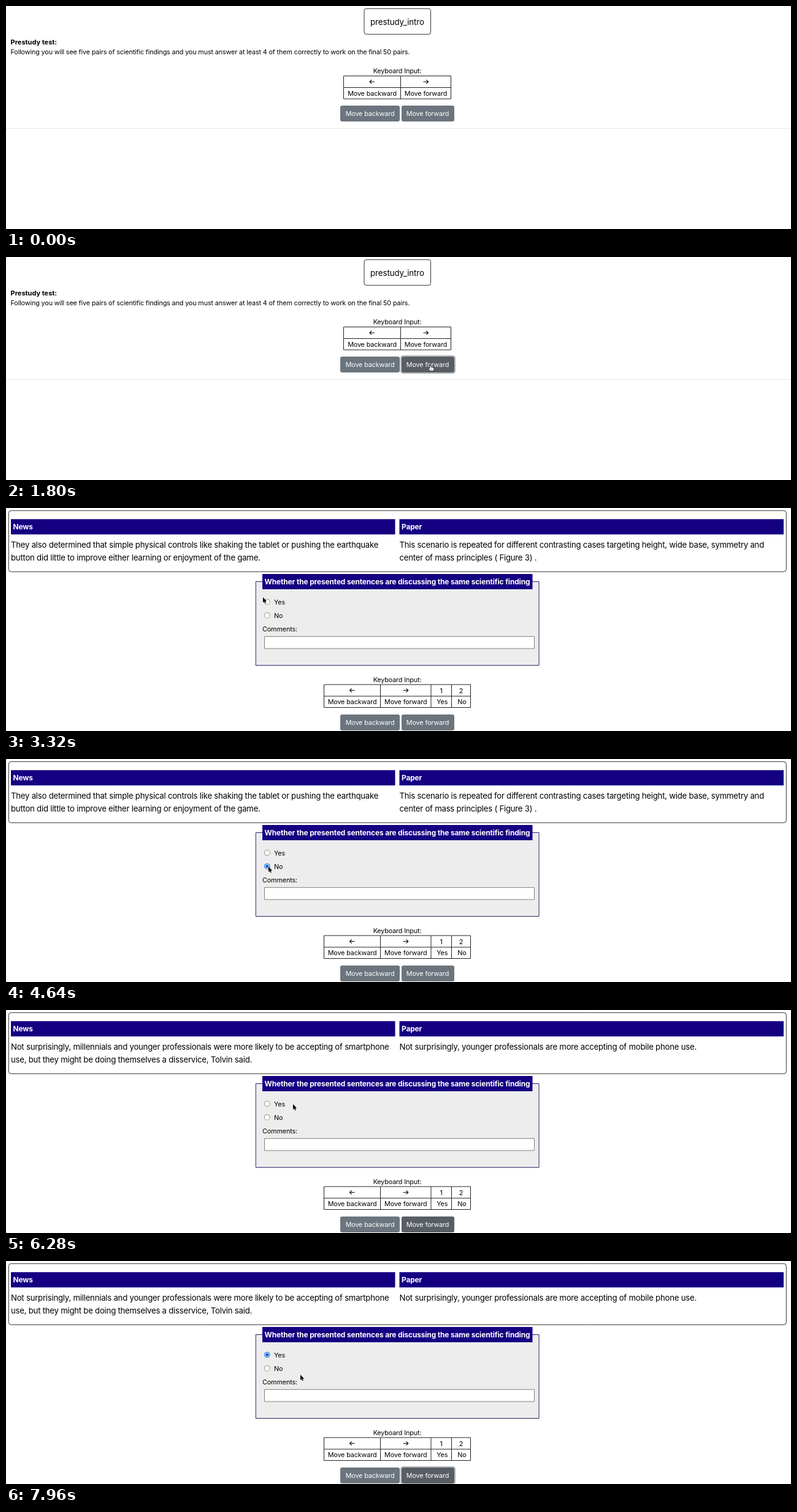
Animation of 1280x365 px, one loop 8000 ms. Source, as an HTML page with a canvas:

```html
<!DOCTYPE html>
<html lang="en">
<head>
<meta charset="utf-8">
<title>Study form</title>
<style>
html, body { margin: 0; width: 100%; height: 100%; overflow: hidden; background: #888; }
canvas { display: block; border-radius: 2px; background: #fff; }
</style>
</head>
<body>
<canvas id="stage" width="1280" height="365"></canvas>
<script>
const ctx = document.getElementById('stage').getContext('2d');
const LOOP = 8000, INK = '#000', NAVY = '#150082';

const FONT = {
  small: ['400 10.8px', '-0.135px'],
  body: ['400 13.2px', '-0.24px'],
  title: ['400 13.3px', '-0.1px'],
  strong: ['700 11px', '0px'],
  head: ['700 11.9px', '-0.12px']
};

const PAIRS = [
  [['They also determined that simple physical controls like shaking the tablet or pushing the earthquake',
    'button did little to improve either learning or enjoyment of the game.'],
   ['This scenario is repeated for different contrasting cases targeting height, wide base, symmetry and',
    'center of mass principles ( Figure 3) .']],
  [['Not surprisingly, millennials and younger professionals were more likely to be accepting of smartphone',
    'use, but they might be doing themselves a disservice, Tolvin said.'],
   ['Not surprisingly, younger professionals are more accepting of mobile phone use.']]
];

// Pointer path: time, x, y
const PATH = [
  [720, 788, 349], [1240, 691, 158], [1400, 691, 158], [1680, 692, 176],
  [2840, 692, 176], [3320, 419, 146], [3680, 424, 150], [4100, 434, 162],
  [4520, 413, 178], [4640, 428, 176], [4760, 428, 176], [5240, 690, 346],
  [5960, 690, 346], [6280, 468, 154], [6800, 425, 152], [6960, 425, 152],
  [7600, 690, 345], [7800, 690, 345], [7960, 480, 186]
];

const within = (t, ...spans) => spans.some(([a, b]) => t >= a && t < b);

function text(str, x, y, style = 'small', color = INK, align = 'left') {
  const [font, spacing] = FONT[style];
  ctx.font = font + ' Inter, "Open Sans", sans-serif';
  ctx.letterSpacing = spacing;
  ctx.textAlign = align;
  ctx.fillStyle = color;
  ctx.fillText(str, x, y);
}

function box(x, y, w, h, fill, stroke, radius = 0, line = 1) {
  ctx.beginPath();
  ctx.roundRect(x, y, w, h, radius);
  if (fill) { ctx.fillStyle = fill; ctx.fill(); }
  if (stroke) { ctx.strokeStyle = stroke; ctx.lineWidth = line; ctx.stroke(); }
}

function lines(color, width, ...runs) {
  ctx.strokeStyle = color;
  ctx.lineWidth = width;
  ctx.beginPath();
  for (const [x, y, ...rest] of runs) {
    ctx.moveTo(x, y);
    for (let i = 0; i < rest.length; i += 2) ctx.lineTo(rest[i], rest[i + 1]);
  }
  ctx.stroke();
}

function arrow(x, y, dir) {
  const tip = x + 4 * dir, back = tip - 3.2 * dir;
  lines(INK, 1.1, [x - 4 * dir, y, tip, y], [back, y - 3.2, tip, y, back, y + 3.2]);
}

// Key table; edges are the column borders
function keyTable(y, edges, extras) {
  const left = edges[0], right = edges[edges.length - 1];
  text('Keyboard Input:', 638, y - 4.5, 'small', INK, 'center');
  box(left, y, right - left, 37.5, null, '#222');
  lines('#222', 1, [left, y + 19, right, y + 19],
    ...edges.slice(1, -1).map(x => [x, y, x, y + 37.5]));
  const mid = i => (edges[i] + edges[i + 1]) / 2;
  arrow(mid(0), y + 9.5, -1);
  arrow(mid(1), y + 9.5, 1);
  ['Move backward', 'Move forward'].forEach((s, i) =>
    text(s, mid(i), y + 32, 'small', INK, 'center'));
  extras.forEach((s, i) => {
    text(String(i + 1), mid(i + 2), y + 13.5, 'small', INK, 'center');
    text(s, mid(i + 2) + 1.5, y + 32, 'small', INK, 'center');
  });
}

function buttons(y, hover, ring) {
  if (ring) box(644, y - 1, 88, 28, null, '#babec2', 4, 2.6);
  box(545, y, 97, 26, '#6c757d', null, 3);
  box(645, y, 86, 26, hover ? '#585e64' : '#6c757d', null, 3);
  text('Move backward', 593.5, y + 17, 'small', '#fff', 'center');
  text('Move forward', 687.5, y + 17, 'small', '#fff', 'center');
}

function dot(x, y, r, color) {
  ctx.beginPath();
  ctx.arc(x, y, r, 0, 7);
  ctx.fillStyle = color;
  ctx.fill();
}

function radio(label, y, on) {
  dot(425.8, y, 4.8, on ? '#0b66d6' : '#7b7b7b');
  dot(425.8, y, on ? 3.7 : 4, '#fff');
  if (on) dot(425.8, y, 2.7, '#0b66d6');
  text(label, 437, y + 4.3);
}

function introPage(hover, ring) {
  box(584, 4.3, 108.5, 42, '#fff', '#333', 3.5);
  text('prestudy_intro', 638, 31, 'title', INK, 'center');
  text('Prestudy test:', 7.5, 62.5, 'strong');
  text('Following you will see five pairs of scientific findings and you must answer at least 4 of them correctly to work on the final 50 pairs.', 7.5, 79);
  keyTable(114.5, [550.5, 643.5, 725.5], []);
  buttons(163, hover, ring);
  lines('#e6e6e6', 1, [0, 200.5, 1280, 200.5]);
}

function pairPage(pair, answer, hover, ring) {
  box(4.3, 4.3, 1268, 100, '#fff', '#333', 4);
  [['News', 8], ['Paper', 641.5]].forEach(([name, x], i) => {
    box(x, 18.2, 626.5, 25, NAVY);
    text(name, x + 3.5, 35.3, 'head', '#fff');
    pair[i].forEach((s, row) => text(s, x, 64.5 + 21 * row, 'body'));
  });
  box(407.3, 120.5, 461.8, 137, '#ededed', '#2c2668');
  box(418, 108, 440.5, 25, NAVY);
  text('Whether the presented sentences are discussing the same scientific finding', 638, 125.3, 'head', '#fff', 'center');
  radio('Yes', 153.5, answer === 'Yes');
  radio('No', 175.7, answer === 'No');
  text('Comments:', 418, 202);
  box(421.5, 210.3, 440, 19.7, '#fff', '#808080');
  keyTable(289, [518.5, 610.5, 693, 726.5, 757.5], ['Yes', 'No']);
  buttons(338, hover, ring);
}

function pointer(t) {
  const i = PATH.findIndex(p => p[0] > t);
  if (i < 0) return PATH[PATH.length - 1].slice(1);
  const [t0, x0, y0] = PATH[i - 1], [t1, x1, y1] = PATH[i];
  const k = (t - t0) / (t1 - t0), e = k * k * (3 - 2 * k);
  return [x0 + (x1 - x0) * e, y0 + (y1 - y0) * e];
}

const ARROW = new Path2D('M0 0V9L2 7.2L3.4 10.3L4.9 9.6L3.5 6.7H6.2Z');
const HAND = new Path2D('M-1 .5Q0-.6 1 .5V4L5 5Q6.3 5.4 6 7L5.2 10.8H-.3L-3 7.3Q-3.6 6 -2.4 5.7L-1 6.6Z');

function cursor(t) {
  if (t < 760) return;
  const hand = within(t, [1560, 2880], [5200, 6000], [7560, 7840]);
  const shape = hand ? HAND : ARROW;
  ctx.save();
  ctx.translate(...pointer(t));
  ctx.lineJoin = 'round';
  ctx.lineWidth = 1;
  ctx.strokeStyle = hand ? '#333' : '#fff';
  ctx.fillStyle = hand ? '#fff' : '#000';
  if (!hand) ctx.stroke(shape);
  ctx.fill(shape);
  if (hand) {
    ctx.stroke(shape);
    lines('#333', .6, [1.2, 7, 1.2, 9], [3, 7, 3, 9]);
  }
  ctx.restore();
}

function draw(t) {
  ctx.fillStyle = '#fff';
  ctx.fillRect(0, 0, 1280, 365);
  const hover = within(t, [1560, 2400], [5200, LOOP]);
  const ring = within(t, [1720, 2400], [5480, 6000], [7720, LOOP]);
  const answer = within(t, [4600, 6000]) ? 'No' : t >= 6840 ? 'Yes' : '';
  if (t < 2400) introPage(hover, ring);
  else pairPage(PAIRS[t < 6000 ? 0 : 1], answer, hover, ring);
  cursor(t);
}

const start = performance.now();
function tick() {
  draw((performance.now() - start) % LOOP);
  requestAnimationFrame(tick);
}
tick();
</script>
</body>
</html>
```
